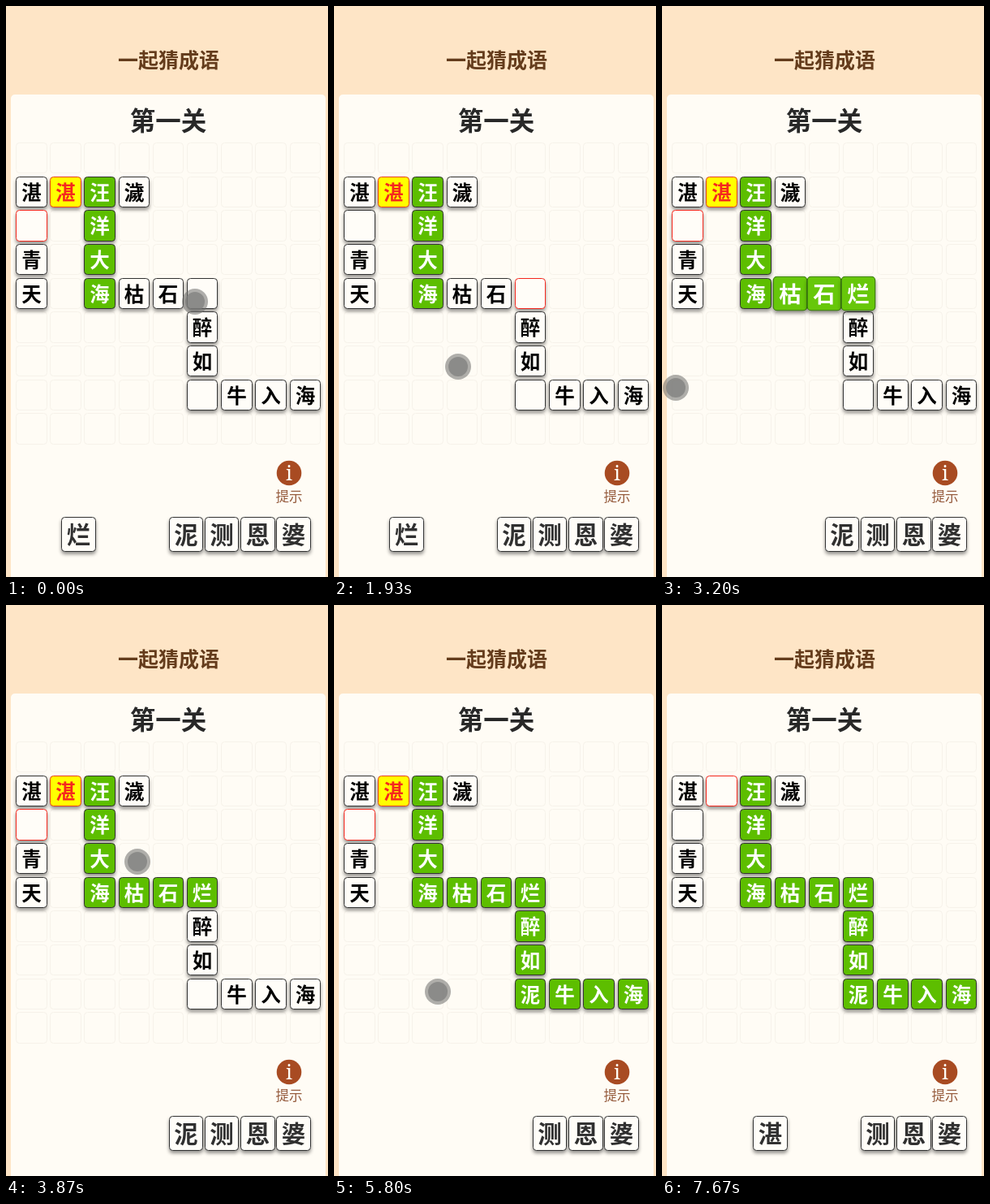
An HTML page for the animation above (8 s loop, 397x703 px).

```html
<!DOCTYPE html>
<html lang="zh-CN">
<head>
<meta charset="utf-8">
<style>
html, body { margin: 0; width: 100%; height: 100%; overflow: hidden; background: #fee5c6; }
svg { display: block; width: 397px; height: 703px; }
text { font-family: "Noto Sans CJK SC", "Noto Sans CJK", sans-serif; font-weight: 700; text-anchor: middle; }
.raised { filter: drop-shadow(0 3px 2px rgba(0, 0, 0, .42)); }
</style>
</head>
<body>
<svg id="stage" viewBox="0 0 397 703">
  <rect x="6" y="109" width="388" height="610" rx="5" fill="#fffcf5"/>
  <text x="200.5" y="75.5" font-size="25" fill="#643c1c">一起猜成语</text>
  <text x="200" y="153" font-size="31.5" fill="#282828">第一关</text>
  <circle cx="349" cy="575" r="15.3" fill="#a84b22"/>
  <text x="349" y="583.5" font-size="25" fill="#fffcf5" style="font-family:'Noto Serif',serif;font-weight:400">i</text>
  <text x="349" y="609.5" font-size="16.5" fill="#955a3c" style="font-weight:400">提示</text>
  <g id="grid"></g>
  <g id="board"></g>
  <g id="cursor"><circle r="16" fill="#6e6e6c" fill-opacity=".55"/><circle r="12" fill="#7c7c7a" fill-opacity=".7"/></g>
</svg>
<script>
const STEP = 15 / 1000, TOTAL = 120;      // steps per ms, steps per loop
const ROWS = ["", "湛湛汪濊", "_ 洋", "青 大", "天 海枯石烂", "     醉", "     如", "     泥牛入海"];
const FILL_LAN = 46, FILL_NI = 79, CLEAR_ZHAN = 115, CURSOR_OUT = 106;
const CELL = 38.4, CHOICE = 42.6;
const SELECTED = [[0, 0, 2], [20, 5, 4], [FILL_LAN, 0, 2], [69, 5, 7], [FILL_NI, 0, 2], [CLEAR_ZHAN, 1, 1]];
// cursor: step, x, y
const PATH = [
  [0, 233, 364], [4, 173, 317], [10, 173, 317], [14, 146, 244], [15, 146, 244], [17, 142, 238],
  [21, 142, 238], [29, 153, 444], [30, 153, 444], [33, 174, 475], [40, 17, 470], [49, 17, 470],
  [58, 162, 316], [59, 162, 316], [66, 143, 343], [69, 143, 343], [75, 127, 477], [86, 127, 477],
  [87, 128, 476], [91, 134, 464], [104, 18, 218], [105, 18, 191], [120, 18, 191]
];
const $ = id => document.getElementById(id);
const colX = c => 12.1 + 42.19 * c;
const rowY = r => 168 + 41.68 * r;

// edges snap to whole pixels, as box layout does
function tile(x, y, size, char, font, style, scale = 1) {
  const { fill, stroke, ink, raised } = style;
  const left = Math.round(x), top = Math.round(y);
  const w = Math.round(x + size) - left, h = Math.round(y + size) - top;
  return `<g transform="translate(${left + w / 2} ${top + h / 2}) scale(${scale})">
    <rect x="${.5 - w / 2}" y="${.5 - h / 2}" width="${w - 1}" height="${h - 1}" rx="4"
      fill="${fill}" stroke="${stroke}" class="${raised ? "raised" : ""}"/>
    <text y="${font * .38 + .5}" font-size="${font}" fill="${ink}">${char}</text></g>`;
}

const STYLE = {
  empty: { fill: "none", stroke: "#f6f2ea" },
  plain: { fill: "#fffdf8", stroke: "#333", ink: "#000", raised: true },
  picked: { fill: "#fffdf8", stroke: "#f5281e", raised: true },
  wrong: { fill: "#ff0", stroke: "#e8401c", ink: "#f5281e", raised: true },
  solved: { fill: "#5dbe00", stroke: "#333", ink: "#fff", raised: true },
  glow: { fill: "#67c70a", stroke: "#37780a", ink: "#fff", raised: true },
  choice: { fill: "#fffdf8", stroke: "#333", ink: "#303030", raised: true }
};

// step at which a cell turns green
function solvedAt(c, r) {
  if (c === 2) return -TOTAL;
  if (r === 4 && c > 2) return FILL_LAN;
  return c > 4 ? FILL_NI : Infinity;
}

function drawBoard(k) {
  const [, pc, pr] = SELECTED.findLast(s => s[0] <= k);
  let html = "", top = "";
  ROWS.forEach((row, r) => [...row].forEach((char, c) => {
    if (char === " ") return;
    const age = k - solvedAt(c, r), second = c === 1 && r === 1;
    const blank = char === "_" || (char === "烂" && k < FILL_LAN) ||
      (char === "泥" && k < FILL_NI) || (second && k >= CLEAR_ZHAN);
    const pulsing = age > 0 && age < 6;
    const style = c === pc && r === pr ? "picked" : second ? "wrong" :
      pulsing ? "glow" : age >= 0 ? "solved" : "plain";
    const scale = pulsing ? 1 + .14 * Math.sin(Math.PI * age / 6) : 1;
    const out = tile(colX(c), rowY(r), CELL, blank ? "" : char, 24.5, STYLE[style], scale);
    if (pulsing) top += out; else html += out;
  }));
  const choices = [
    ["烂", 1, k < FILL_LAN], ["湛", 2, k >= CLEAR_ZHAN], ["泥", 4, k < FILL_NI],
    ["测", 5, true], ["恩", 6, true], ["婆", 7, true]
  ];
  for (const [char, slot, shown] of choices)
    if (shown) html += tile(24 + 44.15 * slot, 629, CHOICE, char, 29.5, STYLE.choice);
  $("board").innerHTML = html + top;
}

function moveCursor(k) {
  const i = PATH.findIndex(p => p[0] > k);
  const [t0, x0, y0] = PATH[i - 1], [t1, x1, y1] = PATH[i];
  const u = (k - t0) / (t1 - t0), e = u * u * (3 - 2 * u);
  $("cursor").setAttribute("transform", `translate(${x0 + (x1 - x0) * e} ${y0 + (y1 - y0) * e})`);
  $("cursor").setAttribute("visibility", k < CURSOR_OUT ? "visible" : "hidden");
}

for (let i = 0; i < 81; i++)
  $("grid").innerHTML += tile(colX(i % 9), rowY(Math.floor(i / 9)), CELL, "", 1, STYLE.empty);

let last = -1;
const start = performance.now();
function frame() {
  const k = Math.floor((performance.now() - start + 4) * STEP) % TOTAL;
  if (k !== last) {
    drawBoard(k);
    moveCursor(k);
    last = k;
  }
  requestAnimationFrame(frame);
}
frame();
</script>
</body>
</html>
```
